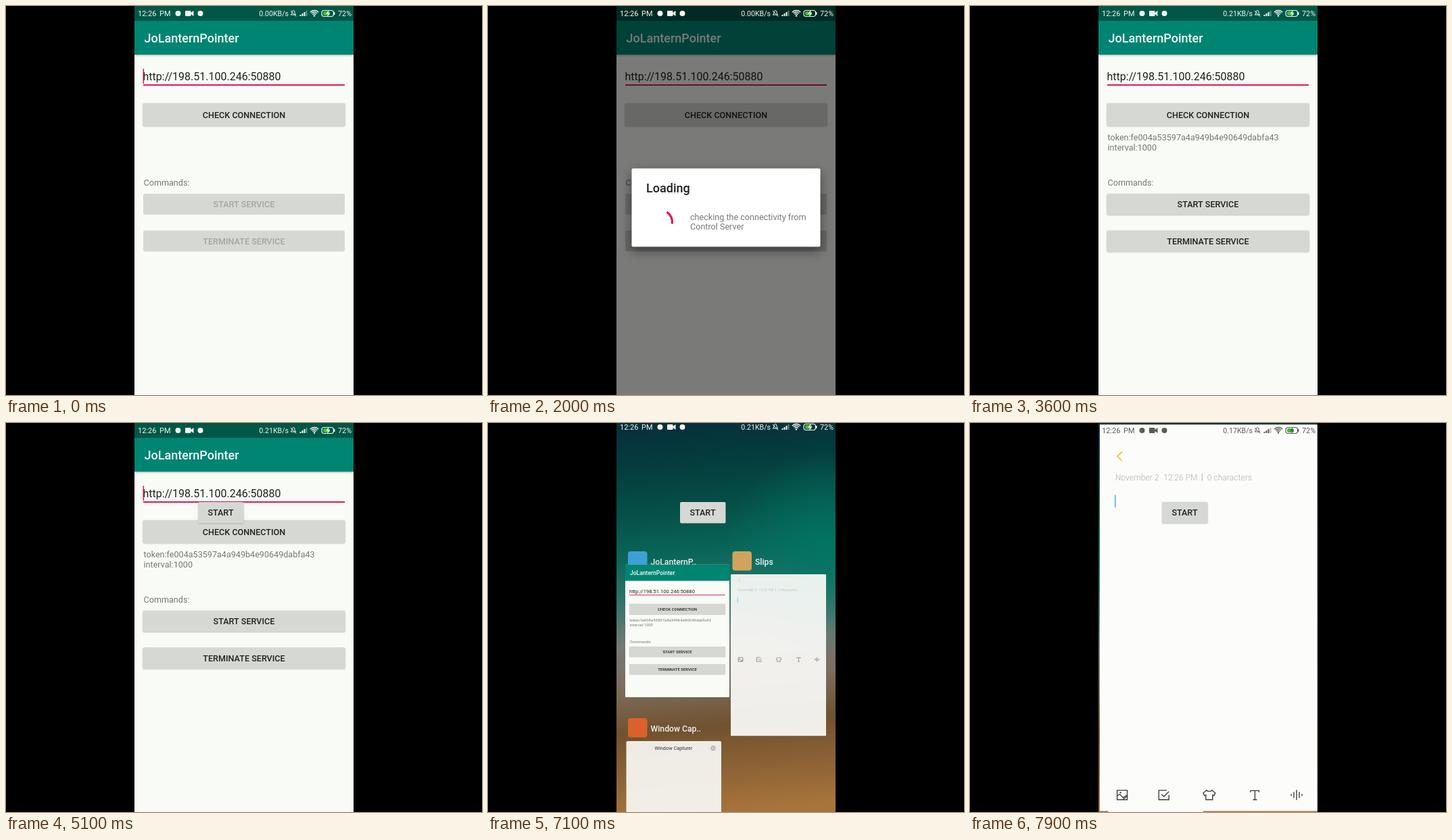
Recreate the animation shown at these times as an HTML page with a canvas. Size 704x576 px, loop 8 s.

```html
<!DOCTYPE html>
<html lang="en">
<head>
<meta charset="utf-8">
<title>Remote service demo</title>
<style>
html, body { margin: 0; width: 100%; height: 100%; overflow: hidden; background: #000; }
canvas { display: block; }
</style>
</head>
<body>
<canvas id="stage" width="704" height="576"></canvas>
<script>
const c = document.getElementById('stage').getContext('2d');
const LOOP = 8000, STEP = 100;
const L = 190, W = 324, H = 576;
const APP = 'JoLanternPointer', URL_TEXT = 'http://198.51.100.246:50880';
const PAGE = '#f9fcf6', FILL = '#d6d8d3', INK = '#20221f', GREY = '#777a74', ACCENT = '#d81b60';

const clamp = v => Math.max(0, Math.min(1, v));
const ramp = (t, start, length) => clamp((t - start) / length);
const easeOut = p => 1 - (1 - p) * (1 - p);
const smooth = p => p * p * (3 - 2 * p);
const mix = (a, b, p) => a.map((v, i) => v + (b[i] - v) * p);

function box(x, y, w, h, fill, r = 0) {
  c.fillStyle = fill;
  c.beginPath();
  c.roundRect(x, y, w, h, r);
  c.fill();
}

// y is the middle of the capital letters
function text(s, x, y, size, fill, weight = 400, align = 'left') {
  c.font = `${weight} ${size}px Roboto, sans-serif`;
  c.textAlign = align;
  c.fillStyle = fill;
  c.fillText(s, x, y + size * 0.355);
}

function line(points, color, width = 1, close = false) {
  c.strokeStyle = color;
  c.lineWidth = width;
  c.beginPath();
  points.forEach(([x, y]) => c.lineTo(x, y));
  if (close) c.closePath();
  c.stroke();
}

function disc(x, y, r, fill) {
  c.fillStyle = fill;
  c.beginPath();
  c.arc(x, y, r, 0, Math.PI * 2);
  c.fill();
}

function ring(x, y, r, from, to, color, width) {
  c.strokeStyle = color;
  c.lineWidth = width;
  c.beginPath();
  c.arc(x, y, r, from, to);
  c.stroke();
}

// Canvas shadows ignore the transform, so scale them here
function raised(x, y, w, h, fill, r, blur, dy, alpha) {
  const scale = c.getTransform().a;
  c.save();
  c.shadowColor = `rgba(0,0,0,${alpha})`;
  c.shadowBlur = blur * scale;
  c.shadowOffsetY = dy * scale;
  box(x, y, w, h, fill, r);
  c.restore();
}

function faded(alpha, draw) {
  if (alpha <= 0) return;
  c.save();
  c.globalAlpha = alpha;
  draw();
  c.restore();
}

// Draws a page, cropped from srcTop down, into the given rectangle
function windowAt([x, y, w, h, srcTop], draw) {
  c.save();
  c.beginPath();
  c.roundRect(x, y, w, h, 1);
  c.clip();
  c.translate(x, y);
  c.scale(w / W, w / W);
  c.translate(-L, -srcTop);
  draw();
  c.restore();
}

function button(label, y, h, enabled) {
  if (enabled) raised(202.5, y, 299, h + 0.5, FILL, 2, 2, 0.6, 0.25);
  else box(203, y, 298, h, FILL, 2);
  text(label, 352, y + h / 2 + 0.5, 12.6, enabled ? INK : '#a4a7a1', 500, 'center');
}

function cursorOn(t) {
  if (t < 1700) return t < 900 || t >= 1400;
  if (t < 2900) return false;
  if (t < 5500) return t < 3500 || Math.floor(t / 500) % 2 === 0;
  return t >= 6100 && t < 6600;
}

function app(t) {
  const ready = t >= 2900;
  box(L, 0, W, H, PAGE);
  raised(L, 22, W, 50, '#008573', 0, 3, 1, 0.35);
  box(L, 0, W, 22, '#005748');
  text(APP, 204.5, 47.5, 18, '#f4faf2', 500);

  text(URL_TEXT, 202.5, 104.5, 16, INK);
  box(203, 116, 298, 2, ACCENT);
  if (cursorOn(t)) box(202.5, 93, 1.6, 22, ACCENT);

  button('CHECK CONNECTION', 144, 33.5, true);
  if (ready) {
    text('token:fe004a53597a4a949b4e90649dabfa43', 203.5, 195, 12.6, GREY);
    text('interval:1000', 203.5, 210, 12.6, GREY);
  }
  text('Commands:', 203.5, 262, 12.6, GREY);
  button('START SERVICE', 278, 31, ready);
  if (t >= 4300 && t < 4800)
    faded(0.15 * (1 - ramp(t, 4500, 300)), () => box(202.5, 278, 299, 32, '#000', 2));
  button('TERMINATE SERVICE', 332.5, 31, ready);
}

function spinner(t) {
  const cycle = (t - 1800) / 1333, n = Math.floor(cycle), p = cycle - n;
  const tail = 270 * (n + smooth(clamp(p * 2 - 1)));
  const head = 270 * (n + smooth(clamp(p * 2))) + 10;
  const turn = -58 + (t - 2000) * 0.201;
  const rad = a => (a + turn) * Math.PI / 180;
  ring(255.5, 319.5, 17, rad(tail), rad(head), ACCENT, 3.4);
}

function dialog(t) {
  const shown = ramp(t, 1600, 250);
  faded(0.51 * shown * (1 - ramp(t, 2950, 300)), () => box(L, 0, W, H, '#000'));
  faded(shown * (1 - ramp(t, 2925, 110)), () => {
    raised(212.5, 240.5, 279, 116, '#fff', 2, 16, 6, 0.45);
    text('Loading', 234, 270, 18, INK, 500);
    text('checking the connectivity from', 299, 312.5, 12.6, GREY);
    text('Control Server', 299, 327, 12.6, GREY);
    spinner(t);
  });
}

function status(t, ink, dy) {
  c.save();
  c.translate(0, dy);
  text('12:26', 195, 11.5, 11, ink);
  text('PM', 227, 11.5, 11, ink);
  disc(254.5, 11, 4, ink);
  disc(287.5, 11, 4, ink);
  box(265, 7, 8.5, 8, ink, 1);
  c.beginPath();
  c.moveTo(272, 11);
  c.lineTo(277.5, 7);
  c.lineTo(277.5, 15);
  c.fill();

  const speed = t < 3500 ? '0.00' : t < 7700 ? '0.21' : '0.17';
  text(speed + 'KB/s', 418, 11.5, 10.6, ink, 400, 'right');

  // muted bell
  line([[421, 13], [423, 11], [423, 8], [425, 6.5], [427, 8], [427, 11], [429, 13]], ink, 1, true);
  line([[421, 7], [429, 15.5]], ink);
  for (let i = 0; i < 4; i++)
    faded(i < 3 ? 1 : 0.4, () => box(434.5 + i * 3, 13 - i * 2, 2, 2 + i * 2, ink));
  for (const r of [3.5, 6, 8.5]) ring(456, 15, r, -Math.PI * 0.76, -Math.PI * 0.24, ink, 1.3);
  disc(456, 14.5, 1.3, ink);

  // charging battery
  box(469, 8, 10, 6, '#3fbd35', 2);
  c.strokeStyle = ink;
  c.lineWidth = 1.2;
  c.beginPath();
  c.roundRect(467, 6.5, 17.5, 9, 3.5);
  c.stroke();
  box(485, 9, 1.4, 4, ink);
  line([[477, 7.5], [474.5, 11], [478, 11], [475.5, 14.5]], ink, 1.3);
  text('72%', 491, 11.5, 10.8, ink);
  c.restore();
}

function noteIcons(y, ink) {
  c.save();
  c.translate(0, y);
  const w = 1.4;
  line([[216, -7], [231, -7], [231, 7], [216, 7]], ink, w, true);
  line([[216, 1], [220, -1], [225, 4], [231, 0]], ink, w);
  line([[224, 7], [231, 2]], ink, w);
  disc(221, -3.5, 1.2, ink);

  line([[290, -7], [278, -7], [278, 7], [293, 7], [293, 0]], ink, w);
  line([[282, -1], [285.5, 2.5], [293, -5]], ink, w);

  line([[349, -7], [351, -5.5], [355, -5.5], [357, -7], [362, -3], [360, 1], [358, 0],
        [358, 7], [348, 7], [348, 0], [346, 1], [344, -3]], ink, w, true);

  line([[414.5, -4], [414.5, -6.5], [427, -6.5], [427, -4]], ink, w);
  line([[421, -6.5], [421, 7]], ink, w);
  line([[418, 7], [424, 7]], ink, w);

  [1.5, 4.5, 7.5, 4.5, 1.5].forEach((h, i) => {
    const x = 475 + i * 4;
    line([[x, -h], [x, h]], ink, w);
  });
  c.restore();
}

function note(iconY, ink) {
  box(L, 0, W, H, '#fcfcfa');
  line([[223.5, 40.5], [216.5, 47.5], [223.5, 54.5]], '#ecc030', 1.6);
  const grey = '#b2b2a6';
  text('November 2', 213, 79.5, 12.2, grey, 300);
  text('12:26 PM', 285, 79.5, 12.2, grey, 300);
  box(342, 73, 1, 11, grey);
  text('0 characters', 350, 79.5, 12.2, grey, 300);
  box(212.5, 105, 1.5, 19, '#35aef2');
  noteIcons(iconY, ink);
}

function wallpaper() {
  const sky = c.createLinearGradient(300, 0, 350, H);
  ['#06303c', '#043e3e', '#065048', '#0a665a', '#30746a', '#747a74', '#7c6c5c', '#70522f', '#8c6236', '#a8743c']
    .forEach((color, i) => sky.addColorStop(i / 9, color));
  box(L, 0, W, H, sky);
  const glow = c.createRadialGradient(500, 190, 10, 500, 190, 150);
  glow.addColorStop(0, 'rgba(0,118,100,.8)');
  glow.addColorStop(1, 'rgba(0,118,100,0)');
  box(L, 0, W, H, glow);
}

const NOTE_CARD = [359, 224, 141, 240, 26];

function recents(alpha) {
  wallpaper();
  faded(alpha, () => {
    const label = (s, x, y, color) => {
      box(x, y - 16, 28.5, 28.5, color, 4);
      text(s, x + 33.5, y, 12.2, '#fff', 500);
    };
    label(APP.slice(0, 9) + 'P..', 207, 206, '#42a6de');
    label('Slips', 361.5, 206, '#e2a95c');
    label('Window Cap..', 207, 453, '#e4622c');
    windowAt(NOTE_CARD, () => note(316, '#555'));
    box(204.5, 471, 140.5, 120, '#fafaf6', 2);
    text('Window Capturer', 274.5, 481.5, 7.3, INK, 400, 'center');
    ring(333, 481.5, 3, 0, 7, GREY, 1);
    disc(333, 481.5, 1, GREY);
  });
}

function startButton(t) {
  faded(ramp(t, 4500, 200), () => {
    raised(284, 117, 67.5, 31.5, FILL, 2, 2, 0.6, 0.25);
    text('START', 317.5, 133, 12.6, INK, 500, 'center');
  });
}

function draw(t) {
  c.fillStyle = '#000';
  c.fillRect(0, 0, 704, H);
  c.save();
  c.beginPath();
  c.rect(L, 0, W, H);
  c.clip();

  const noteOpen = easeOut(ramp(t, 7550, 390));
  let slide = 0;
  if (t < 6770) {
    app(t);
    dialog(t);
  } else {
    recents(ramp(t, 6770, 360));
    const shrink = easeOut(ramp(t, 6770, 450));
    windowAt(mix([L, 22, W, 554, 22], [204, 224, 141, 169, 22], shrink), () => app(t));
    if (noteOpen > 0)
      windowAt(mix(NOTE_CARD, [L, 0, W, H, 0], noteOpen), () => note(552, '#3c3e38'));
    slide = -22 * ramp(t, 7050, 220) * (1 - ramp(t, 7550, 200));
  }
  status(t, noteOpen > 0.8 ? '#5a5c56' : '#f2f7f0', slide);
  startButton(t);
  c.restore();
}

function frame() {
  const now = performance.now() % LOOP;
  draw(Math.floor(now / STEP) * STEP);
  requestAnimationFrame(frame);
}
frame();
</script>
</body>
</html>
```
